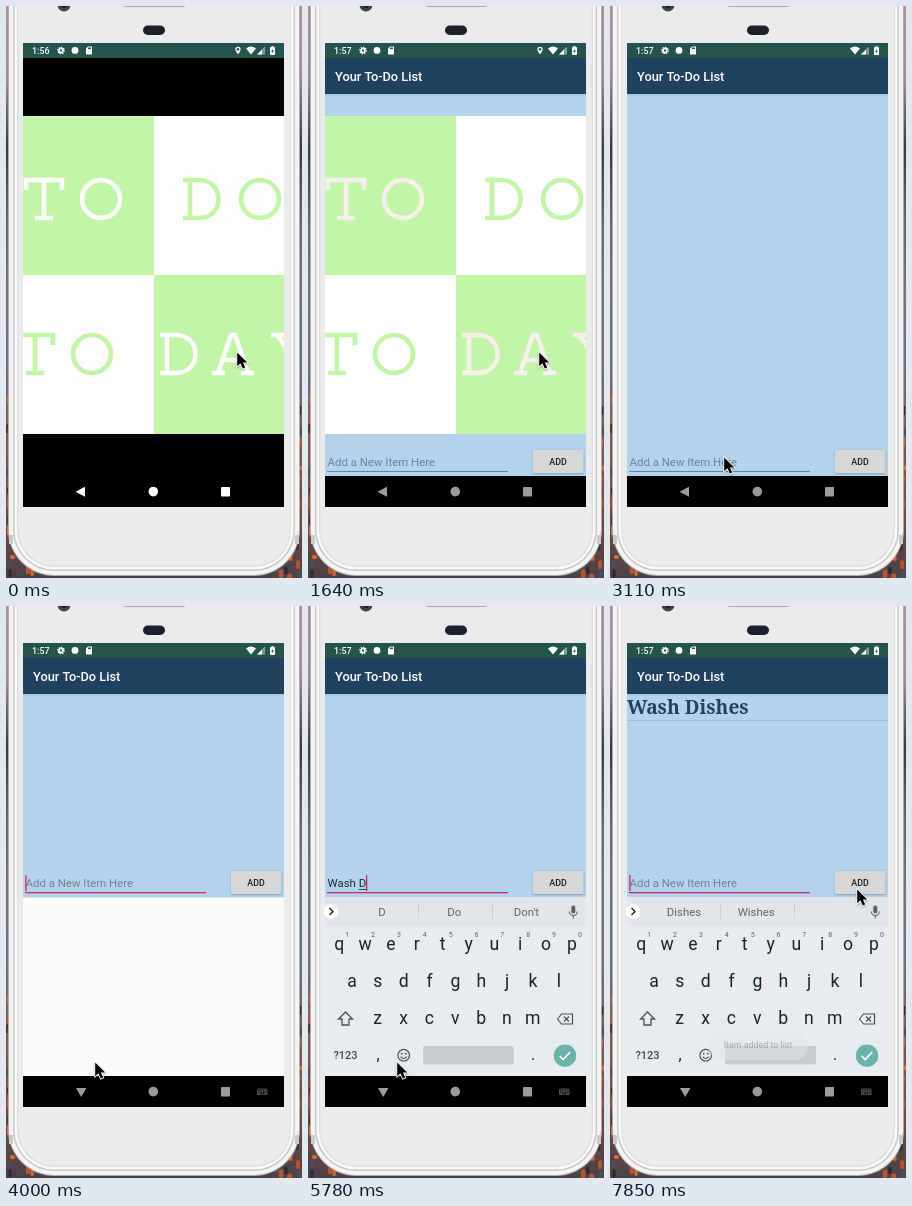
An HTML page with a canvas that plays this animation: 296 px wide and 572 px high, repeating every 8000 ms.

```html
<!DOCTYPE html>
<html lang="en">
<head>
<meta charset="utf-8">
<title>To-do list demo</title>
<style>
html, body { margin: 0; width: 100%; height: 100%; overflow: hidden; }
canvas { display: block; width: 296px; height: 572px; }
</style>
</head>
<body>
<canvas id="stage" width="296" height="572"></canvas>
<script>
const c = document.getElementById('stage').getContext('2d');
const LOOP = 8000, ROBOTO = 'Roboto, sans-serif';
const PINK = '#d5215f', GREEN = '#c3f5a9', INK = '#14242c';

// Events in ms
const SPLASH_OUT = 1640, LIST_IN = 1790, FOCUS = 3410, RAISE = 3850, KEYBOARD = 4150, ADDED = 7560;

const TYPING = [
  [4740, 'W', ['W', 'We', 'What']], [4890, 'Wa', ['Wa', 'Was', 'Want']],
  [5030, 'Was', ['Was', 'Wash', 'Wasn\'t']], [5180, 'Wash', ['Wash', 'Washed', 'Washing']],
  [5480, 'Wash ', ['the', 'your', 'and']], [5780, 'Wash D', ['D', 'Do', 'Don\'t']],
  [5930, 'Wash Di', ['Di', 'Did', 'Didn\'t']], [6080, 'Wash Dis', ['Dis', 'Did', 'This']],
  [6230, 'Wash Dish', ['Dish', 'Dishes', 'Wish']], [6380, 'Wash Dishe', ['Dishe', 'Dishes', 'Wishes']],
  [6530, 'Wash Dishes', ['Dishes', 'Wishes', '']]
];

const POINTER = [
  [1640, 230, 345], [2520, 117, 452], [2960, 117, 452], [3110, 113, 450], [3410, 113, 450],
  [3850, 88, 455], [6380, 88, 455], [6820, 263, 342], [7260, 246, 282]
];

const GLYPHS = {
  T: 'M2 12V2H38V12M20 2V40M11 40H29',
  O: 'M2 21a19 19 0 1 0 38 0a19 19 0 1 0-38 0',
  D: 'M0 2H16C42 2 42 40 16 40H0M7 2V40',
  A: 'M0 40H13M29 40H42M6 40L19 2H23L36 40M11 27H31',
  Y: 'M0 2H14M28 2H42M6 2L21 23L36 2M21 23V40'
};

function rect(x, y, w, h, color, r = 0) {
  c.fillStyle = color;
  c.beginPath();
  c.roundRect(x, y, w, h, r);
  c.fill();
}

function disc(x, y, r, color) {
  c.fillStyle = color;
  c.beginPath();
  c.arc(x, y, r, 0, 7);
  c.fill();
}

function text(s, x, y, size, color, align = 'left', weight = 400, family = ROBOTO) {
  c.font = `${weight} ${size}px ${family}`;
  c.textAlign = align;
  c.fillStyle = color;
  c.fillText(s, x, y);
}

function shape(d, x, y, color, width = 0) {
  c.save();
  c.translate(x, y);
  const p = new Path2D(d);
  if (width) {
    c.strokeStyle = color;
    c.lineWidth = width;
    c.stroke(p);
  } else {
    c.fillStyle = color;
    c.fill(p);
  }
  c.restore();
}

function fade(y0, y1, ...colors) {
  const g = c.createLinearGradient(0, y0, 0, y1);
  colors.forEach((color, i) => g.addColorStop(i / (colors.length - 1), color));
  return g;
}

function wallpaper() {
  rect(0, 0, 296, 572, fade(0, 572, '#b08f9c', '#a18a93', '#3b3640', '#6b6470', '#747283', '#6b7086', '#82594f', '#7c4a3a', '#4a4148'));
  let seed = 7;
  const rnd = () => (seed = seed * 16807 % 2147483647) / 2147483647;
  const colors = ['#d8692f', '#2c2a35', '#b6552f', '#4a4c60'];
  for (let i = 0; i < 110; i++) {
    const y = 385 + 187 * rnd();
    const x = rnd() * (y > 525 ? 35 : 6);
    rect(rnd() < .5 ? x : 292 - x, y, 3 + rnd() * 2, 4 + rnd() * 6, colors[rnd() * 4 | 0], 1.5);
  }
}

function phone() {
  [[2, '#a9abb0'], [3, '#f4f4f5'], [7, '#c6c8cb'], [8.5, '#f9f9fa'], [11, '#dee0e2'], [12.5, '#e9ebed']]
    .forEach(([m, color]) => rect(m, -80, 296 - 2 * m, 652 - m, color, 48 - m));
  rect(3, 529, 4, 9, '#c8cbce');
  rect(289, 529, 4, 9, '#c8cbce');
  disc(58, -1, 6.5, '#40434b');
  disc(58, -1, 3, '#191c25');
  rect(118, -2, 61, 3, '#a7aaae', 1.5);
  rect(137, 19.5, 22, 9.5, '#1c202b', 4.7);
}

function statusBar(t) {
  rect(17, 37, 261, 15, '#25544b');
  text(t < 890 ? '1:56' : '1:57', 26, 48, 8.9, '#fff', 'left', 500);
  c.setLineDash([1.4, 1]);
  shape('M3.2 0A3.2 3.2 0 1 1 3.2-.01', 55, 44.5, '#fff', 1.3);
  c.setLineDash([]);
  shape('M2 0A2 2 0 1 1 2-.01', 55, 44.5, '#fff', 1.7);
  disc(69, 44.4, 3.4, '#fff');
  shape('M2 0H6V8H0V2Z', 80, 40.5, '#fff');
  rect(82, 41.5, 3, 1.5, '#25544b');
  if (t < LIST_IN) {
    shape('M0 7.5C-4 3 -3 0 0 0S4 3 0 7.5', 232, 40.7, '#fff');
    disc(232, 43.3, 1.3, '#25544b');
  }
  shape('M0 2Q5-2 10 2L5 8Z', 240, 40.5, '#fff');
  shape('M0 8L8 0V8Z', 251, 40.5, '#7fa099');
  shape('M0 8L5 3V8Z', 251, 40.5, '#fff');
  rect(264, 41, 5, 8, '#fff', .7);
  rect(265.5, 40, 2, 1.5, '#fff');
  shape('M2.2 0L0 3H1.5L1 5L3 2H1.8Z', 265, 42.7, '#25544b');
}

function navBar(t) {
  rect(17, 470, 261, 31, '#000');
  const color = t < 290 ? '#fff' : t < 440 ? '#e8e8e8' : t < 740 ? '#cfcfcf'
    : t < 890 ? '#bdbdbd' : t < 1040 ? '#ababab' : '#9c9c9c';
  if (t < RAISE) shape('M0 5L9.5 0V10Z', 69.5, 480.7, color);
  else shape('M0 0H10.5L5.2 9Z', 70, 482, color);
  disc(147.3, 485.6, 4.8, color);
  rect(215, 481, 9, 9.5, color, .7);
  if (t >= RAISE) {
    rect(251, 482.5, 10.5, 6.5, '#4c4c4c', 1);
    for (let i = 0; i < 8; i++) rect(252.1 + i % 4 * 2.4, 483.5 + (i >> 2) * 2, 1.2, 1, '#000');
    rect(254, 487.3, 5, .8, '#000');
  }
}

function word(letters, y, color) {
  letters.forEach(([k, x]) => shape(GLYPHS[k], x, y, color, 4.6));
}

function splash(t) {
  const light = t < SPLASH_OUT ? '#fdfdfd' : '#fff';
  const pale = t < SPLASH_OUT ? '#fdfdfd' : '#f6f1eb';
  c.save();
  c.beginPath();
  c.rect(17, 110, 261, 318);
  c.clip();
  rect(17, 110, 261, 318, light);
  rect(17, 110, 131, 159, GREEN);
  rect(148, 269, 130, 159, GREEN);
  word([['T', 18], ['O', 74]], 172, pale);
  word([['D', 177], ['O', 233]], 172, GREEN);
  word([['T', 9], ['O', 65]], 327, GREEN);
  word([['D', 154], ['A', 206], ['Y', 265]], 327, pale);
  c.restore();
}

function field(t, typed) {
  const y = t < RAISE ? 456 : 277;
  const focused = t >= FOCUS;
  if (typed) text(typed, 19.5, y + 4.3, 11.43, '#1c2a35');
  else text('Add a New Item Here', 19.5, y + 4.3, 11.43, '#708596');
  rect(19, y + 9, 181, focused ? 1.2 : .8, focused ? PINK : '#54687a');

  c.font = '400 11.43px ' + ROBOTO;
  const end = 19.5 + c.measureText(typed).width;
  if (typed && !typed.endsWith(' ')) {
    const start = 19.5 + c.measureText(typed.slice(0, typed.lastIndexOf(' ') + 1)).width;
    rect(start, y + 6, end - start, .8, '#1c2a35');
  }
  const blinkOff = (t >= 4300 && t < 4740) || (t >= 6970 && t < ADDED);
  if (focused && !blinkOff) rect(end - .2, y - 8, 1.3, 16, PINK);

  c.save();
  c.shadowColor = 'rgba(0,0,0,.3)';
  c.shadowBlur = 2;
  c.shadowOffsetY = .7;
  rect(225, y - 12, 50.5, 23, '#d6d7d7', 1.3);
  c.restore();
  text('ADD', 250, y + 3.2, 8.9, '#1c1c1c', 'center', 500);
}

function listScreen(t, typed) {
  rect(17, 88, 261, 383, '#b3d3ec');
  rect(17, 88, 261, 2, fade(88, 90, 'rgba(40,75,110,.14)', 'rgba(40,75,110,0)'));
  rect(17, 52, 261, 36, '#20415f');
  text('Your To-Do List', 27, 75, 12.8, '#fff', 'left', 500);
  if (t >= ADDED) {
    text('Wash Dishes', 17, 107.6, 19.2, '#20415f', 'left', 700, '"Noto Serif", serif');
    rect(17, 114, 261, .8, '#9bb9d0');
  }
  if (t >= RAISE) rect(17, 291.5, 261, 179.5, '#fafafa');
  field(t, typed);
}

function keyRow(keys, x, y, upper) {
  [...keys].forEach((k, i) => text(upper ? k.toUpperCase() : k, x + i * 25.85, y, 17.6, INK, 'center'));
}

function keyboard(t, hints) {
  const upper = t < 4740;
  rect(17, 291.5, 261, 180, '#e8ecef');
  rect(17, 291.5, 261, 28.5, '#e2e6e9');
  disc(23, 305.5, 7.3, '#fff');
  shape('M0 0L3.5 3.5L0 7', 21.5, 302, '#222', 1.4);
  hints.forEach((s, i) => text(s, 74 + i * 72.2, 310, 11.4, '#5c676d', 'center'));
  if (hints.length) [110, 184].forEach(x => rect(x, 298, .8, 15, '#c5cacd'));
  rect(263.3, 299.5, 4, 8, '#59646a', 2);
  shape('M-4 0A4 4 0 0 0 4 0M0 4V7', 265.3, 305.5, '#59646a', 1.1);

  keyRow('qwertyuiop', 31.3, 343.5, upper);
  [...'1234567890'].forEach((n, i) => text(n, 39.2 + i * 25.85, 331, 7, '#59646a', 'center'));
  keyRow('asdfghjkl', 44, 381, upper);
  keyRow('zxcvbnm', 69.7, 418, upper);
  const shift = 'M0-6.5L7 .5H3.5V6.5H-3.5V.5H-7Z';
  if (upper) shape(shift, 37.5, 412.5, INK);
  shape(shift, 37.5, 412.5, '#455158', 1.3);
  shape('M0 5L4 0H15V10H4ZM6.5 2.5L11.5 7.5M11.5 2.5L6.5 7.5', 249.5, 408, '#455158', 1.2);

  text('?123', 37.5, 453.3, 11, '#3e4a50', 'center', 500);
  text(',', 70, 454, 16, INK, 'center');
  shape('M5.8 0A5.8 5.8 0 1 1 5.8-.01M-3 1.5Q0 5 3 1.5', 95.7, 449.2, '#455158', 1.1);
  disc(93.7, 447.7, .9, '#455158');
  disc(97.7, 447.7, .9, '#455158');
  rect(115, 440, 91, 18.5, '#c8ccd0', 2);
  text('.', 225, 454, 16, INK, 'center');
  disc(257, 449.7, 11.2, '#6ab2aa');
  shape('M0 4L3.5 7.5L10.5 0', 251.7, 446, '#fff', 1.6);
}

function toast(t) {
  c.save();
  c.globalAlpha = Math.min(1, (t - ADDED) / 580);
  rect(98, 426, 100, 28, '#e6e8ea', 14);
  text('Item added to list', 148, 442.3, 8.9, '#63696d', 'center');
  c.restore();
}

function pointer(t) {
  let i = POINTER.findIndex(p => p[0] > t);
  if (i < 0) i = POINTER.length;
  const a = POINTER[Math.max(0, i - 1)], b = POINTER[Math.min(i, POINTER.length - 1)];
  let k = b[0] > a[0] ? Math.max(0, (t - a[0]) / (b[0] - a[0])) : 0;
  k = k * k * (3 - 2 * k);
  c.save();
  c.shadowColor = 'rgba(0,0,0,.3)';
  c.shadowBlur = 2;
  c.shadowOffsetY = 1;
  const x = a[1] + (b[1] - a[1]) * k + .5, y = a[2] + (b[2] - a[2]) * k + .6;
  const arrow = 'M.7.8V14.7L3.9 11.7L6.3 17L8.7 16L6.4 10.8H10.8Z';
  shape(arrow, x, y, '#fff', 1.6);
  c.restore();
  shape(arrow, x, y, '#000');
}

function draw(t) {
  wallpaper();
  phone();
  const step = TYPING.filter(s => s[0] <= t).pop() || [0, '', []];
  if (t < SPLASH_OUT) rect(17, 52, 261, 449, '#000');
  else listScreen(t, t < ADDED ? step[1] : '');
  if (t < LIST_IN) splash(t);
  if (t >= KEYBOARD) keyboard(t, step[2]);
  statusBar(t);
  navBar(t);
  if (t >= ADDED) toast(t);
  pointer(t);
}

function tick(now) {
  draw(now % LOOP);
  requestAnimationFrame(tick);
}
requestAnimationFrame(tick);
</script>
</body>
</html>
```
